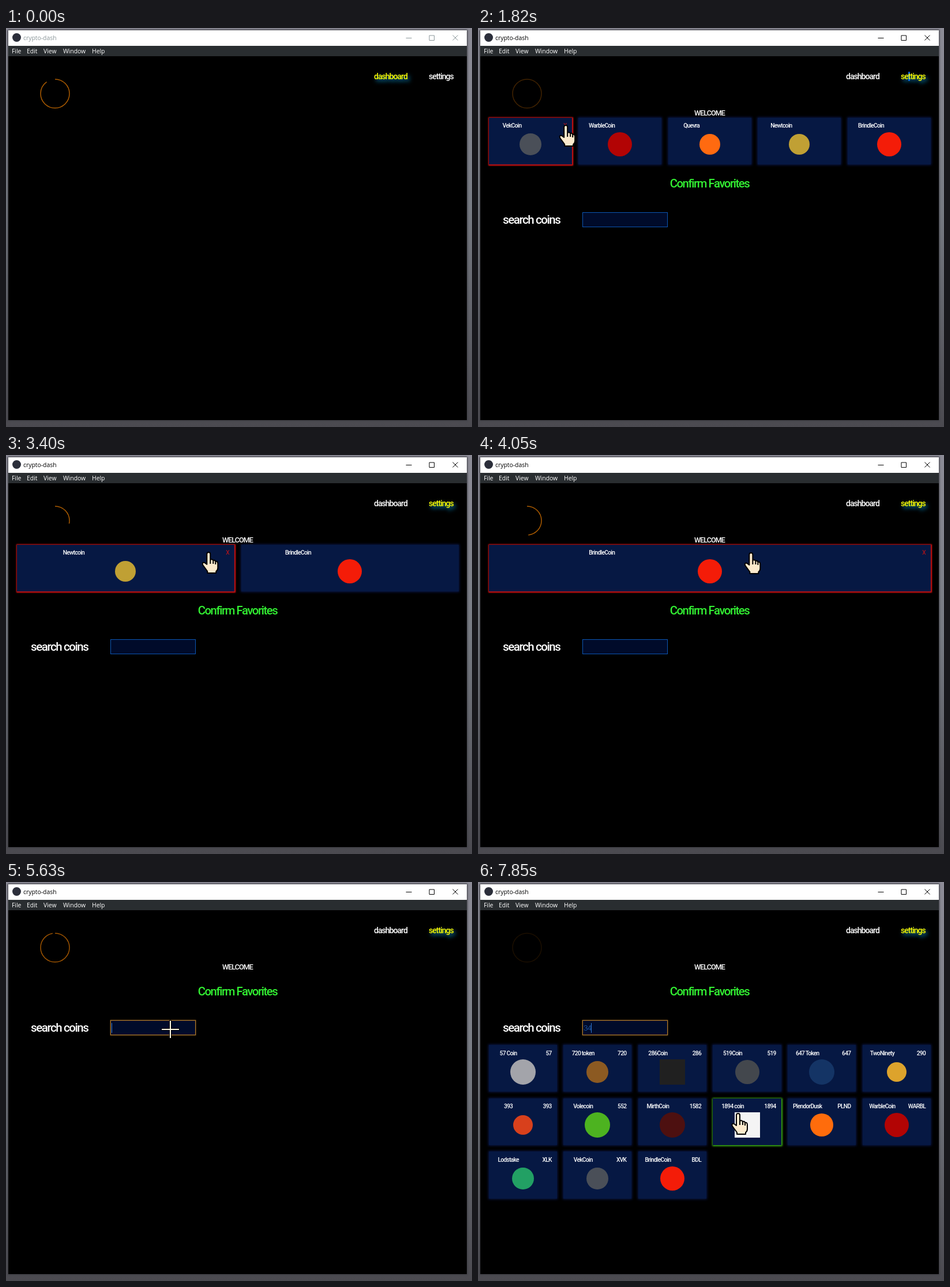
Write an HTML page that moves like this. It is 808 by 693 pixels and loops after 8 s.

```html
<!DOCTYPE html>
<html lang="en">
<head>
<meta charset="utf-8">
<title>crypto-dash</title>
<style>
  html, body { margin: 0; width: 100%; height: 100%; overflow: hidden; }
  body {
    position: relative;
    background: linear-gradient(#8d8c97, #777b83 45%, #4b4a50);
    font: 500 14px/20px Roboto, sans-serif;
    color: #fff;
  }
  body *, .layer { position: absolute; white-space: nowrap; }
  .layer { inset: 0; }
  .window { left: 4px; top: 4px; width: 795px; height: 677px; background: #000; box-shadow: 0 0 3px 1px #3a3b40; }
  .bar { left: 4px; width: 795px; }
  .title { top: 4px; height: 27px; background: #fff; }
  .menu { top: 31px; height: 18px; background: #292d30; }
  .ui { font: 400 10.4px/20px "Open Sans", sans-serif; }
  #chrome { color: #8a9699; }
  #chrome.active { color: #000; }
  #chrome svg { left: 690px; top: 10px; fill: none; stroke: currentColor; }
  .badge { left: 11px; top: 9px; width: 15px; height: 15px; border-radius: 50%; background: #2b2e3a; }

  .nav, .welcome, .confirm, .search, .card, #field { letter-spacing: -.07em; }
  .nav { top: 74px; }
  .nav.on { color: #ff0; text-shadow: 3px 4px 7px #0088b8; }
  .nav span { position: static; }
  .nav .picked { background: #0a64d8; }
  .welcome { left: 4px; width: 795px; top: 138px; font-size: 12.5px; text-align: center; }
  .confirm { left: 4px; width: 795px; top: 260px; font-size: 20.3px; text-align: center; color: #33f233; }
  .search { left: 43px; top: 323px; font-size: 20.5px; }
  #field {
    left: 181px; top: 320px; width: 146px; height: 24px;
    border: 1px solid #0d56b4; background: #000b2a;
    font-size: 13.5px; line-height: 25px; font-weight: 300; color: #2668bd;
  }
  #field.focus { border-color: #a9752a; box-shadow: 0 0 0 .5px #8a5f22; }
  #typed { left: 1px; top: 0; }
  #caret { top: 4px; width: 1px; height: 17px; background: #2f78d6; }

  .grid { left: 18.5px; width: 766.5px; display: grid; gap: 11.5px; grid-auto-rows: 81.1px; }
  #favs { top: 155.5px; grid-auto-flow: column; grid-auto-columns: 1fr; }
  #list { top: 283.3px; grid-template-columns: repeat(6, 1fr); }
  .card { position: relative; background: #061843; box-shadow: 0 0 4px 1px #0a1648; font-size: 10.2px; }
  .name { left: 9px; width: calc(50% - 9px); top: 4.5px; display: flex; justify-content: center; }
  .code { right: 9px; top: 4.5px; }
  .coin { left: 50%; top: 46.5px; transform: translate(-50%, -50%); }
  #favs .code { color: #d01212; font-weight: 400; visibility: hidden; }
  #favs .hot { box-shadow: 0 0 2px 1.5px #e01212; }
  #favs .hot .code { visibility: visible; }
  #list .hot { box-shadow: 0 0 3px 1.5px #4ad916; }

  #logo { left: 50px; top: 74px; width: 70px; height: 80px; fill: none; stroke: #d97400; stroke-width: 1.5; }
  #pointer { left: 0; top: 0; width: 1px; height: 1px; overflow: visible; }
</style>
</head>
<body>
<div class="window"></div>
<div class="bar title"></div>
<div class="bar menu"></div>
<div id="chrome" class="layer ui">
  <div class="badge"></div>
  <div style="left:30px;top:7px">crypto-dash</div>
  <svg width="100" height="15"><path d="M3.5 7.5h10M44 3h8.500v8.500h-8.500zM84.500 2.500l9 9M93.500 2.500l-9 9"/></svg>
</div>
<div class="layer ui">
  <div style="left:10px;top:30px">File</div>
  <div style="left:36px;top:30px">Edit</div>
  <div style="left:65px;top:30px">View</div>
  <div style="left:99px;top:30px">Window</div>
  <div style="left:149px;top:30px">Help</div>
</div>

<svg id="logo"><circle id="ring" cx="35" cy="40" r="25" pathLength="1" stroke-dasharray="1" transform="rotate(-90 35 40)"/></svg>
<div id="home" class="nav" style="left:638px">dashboard</div>
<div id="prefs" class="nav" style="left:733px">se<span id="pick">t</span>tings</div>

<div id="page" class="layer">
  <div class="welcome">WELCOME</div>
  <div id="favs" class="grid"></div>
  <div id="lower" class="layer">
    <div class="confirm">Confirm Favorites</div>
    <div class="search">search coins</div>
    <div id="field"><span id="typed"></span><span id="caret"></span></div>
  </div>
  <div id="list" class="grid"></div>
</div>

<svg id="pointer">
  <circle id="press" r="11" fill="#ffe114" fill-opacity=".53"/>
  <path id="hand" fill="#fbe9cc" stroke="#000" stroke-width="2" stroke-linejoin="round"
    d="M-2 2Q-2-1 1-1T4 2V12Q7 10 9 13Q12 12 13 15Q17 14 17 19V26Q17 30 14 32V35H-1V32L-9 21Q-11 16-6 17L-2 20ZM4 12v7M9 13v6M13 15v5"/>
  <g id="cross" fill="none">
    <path d="M-16 0H16M0-16V16" stroke="#000" stroke-width="4"/>
    <path d="M-15 0H15M0-15V15" stroke="#fffbe8" stroke-width="2"/>
  </g>
</svg>

<script>
const LOOP = 8000, LOGO_CYCLE = 5400, LOGO_START = 2480;
const $ = id => document.getElementById(id);
const show = (el, on) => { el.style.display = on ? '' : 'none'; };

// name | code | colour | size | corner radius
const favorites = [
  'VekCoin|X|#4a4f58|38|50%', 'WarbleCoin|X|#b20404|42|50%', 'Quevra|X|#ff6a10|36|50%',
  'Newtcoin|X|#c0a034|36|50%', 'BrindleCoin|X|#f41c08|42|50%'
];
const results = [
  '57 Coin|57|#a3a4aa|44|50%', '720 token|720|#8c5a22|38|50%', '286Coin|286|#202020|44|0',
  '519Coin|519|#43474d|42|50%', '647 Token|647|#143465|44|50%', 'TwoNinety|290|#dda32c|34|50%',
  '393|393|#d8401c|34|50%', 'Volecoin|552|#4db320|44|50%', 'MirthCoin|1582|#4d1010|44|50%',
  '1894 coin|1894|#f4f4f4|44|0', 'PlendorDusk|PLND|#ff6c0c|40|50%', 'WarbleCoin|WARBL|#b20404|42|50%',
  'Lodstake|XLK|#22a064|38|50%', 'VekCoin|XVK|#4a4f58|38|50%', 'BrindleCoin|BDL|#f41c08|42|50%'
];

function addCard(grid, spec) {
  const [name, code, color, size, radius] = spec.split('|');
  const card = document.createElement('div');
  card.className = 'card';
  card.innerHTML = `<div class="name">${name}</div><div class="code">${code}</div>
    <div class="coin" style="width:${size}px;height:${size}px;background:${color};border-radius:${radius}"></div>`;
  grid.append(card);
  return card;
}
const favCards = favorites.map(s => addCard($('favs'), s));
const cards = favCards.concat(results.map(s => addCard($('list'), s)));

const path = [
  [120, 600, 560], [700, 742, 88], [930, 748, 85], [1210, 635, 166], [1620, 152, 170],
  [2100, 150, 170], [2480, 187, 170], [2700, 187, 170], [2980, 252, 170], [3120, 252, 170],
  [3400, 350, 170], [3520, 384, 170], [3800, 384, 170], [4300, 560, 172], [4730, 754, 170],
  [4780, 770, 170], [4880, 770, 170], [5030, 305, 295], [5350, 285, 256], [6000, 285, 256],
  [6700, 356, 262], [6870, 370, 264], [7000, 370, 264], [7500, 450, 403]
];
const clicks = [[760, 850], [900, 970], [2010, 2090], [2560, 2680], [3010, 3090], [3590, 3690], [4790, 4860], [5390, 5480]];
const crossTimes = [[120, 650], [4450, 4770], [4890, 7400]];
const removals = [2090, 2560, 3090, 3690, 4860];
const glow = [[0, .2], [.17, .8], [.54, .8], [.78, .45], [1, .12]];
const keys = [6600, 6830];
const FOCUS = 5400;

const within = (spans, t) => spans.some(([a, b]) => t >= a && t < b);

// Linear value of a keyed track at time t
function track(points, t) {
  const i = points.findIndex(p => p[0] > t);
  if (i < 0) return points[points.length - 1].slice(1);
  if (i === 0) return points[0].slice(1);
  const a = points[i - 1], b = points[i], k = (t - a[0]) / (b[0] - a[0]);
  return a.slice(1).map((v, j) => v + (b[j + 1] - v) * k);
}

function drawLogo(t) {
  const p = ((t - LOGO_START + LOGO_CYCLE) % LOGO_CYCLE) / LOGO_CYCLE;
  $('ring').style.strokeDashoffset = 1 - Math.min(1, p / .6);
  $('ring').style.opacity = track(glow, p)[0];
}

function drawField(t) {
  const focused = t >= FOCUS;
  const typed = keys.filter(k => k <= t).length;
  const blinkStart = typed ? keys[typed - 1] : FOCUS;
  $('field').classList.toggle('focus', focused);
  $('typed').textContent = '34'.slice(0, typed);
  $('caret').style.left = 1 + typed * 6.6 + 'px';
  show($('caret'), focused && (t - blinkStart) % 1000 < 500);
}

function drawPointer(t, x, y) {
  const cross = within(crossTimes, t);
  show($('pointer'), t >= path[0][0]);
  show($('cross'), cross);
  show($('hand'), !cross);
  show($('press'), within(clicks, t));
  $('pointer').style.transform = `translate(${x}px, ${y}px)`;
}

function render(t) {
  const open = t >= 960;
  const removed = removals.filter(r => t >= r).length;
  const [x, y] = track(path, t);

  $('chrome').classList.toggle('active', t >= 760);
  $('home').classList.toggle('on', !open);
  $('prefs').classList.toggle('on', open);
  $('pick').classList.toggle('picked', t >= 920 && t < 2010);
  show($('page'), open);
  // One card is gone after the first removal; the second click is still pressed on the next
  const gone = removals.filter((r, i) => t >= (i === 1 ? clicks[3][1] : r)).length;
  favCards.forEach((card, i) => show(card, i >= gone));
  $('lower').style.transform = `translateY(${removed === 5 ? -80 : 0}px)`;
  show($('list'), t >= 7330);

  cards.forEach(card => {
    const r = card.getBoundingClientRect();
    card.classList.toggle('hot', x > r.left && x < r.right && y > r.top && y < r.bottom);
  });
  drawLogo(t);
  drawField(t);
  drawPointer(t, x, y);
}

const start = performance.now();
function tick() {
  render((performance.now() - start) % LOOP);
  requestAnimationFrame(tick);
}
tick();
</script>
</body>
</html>
```
